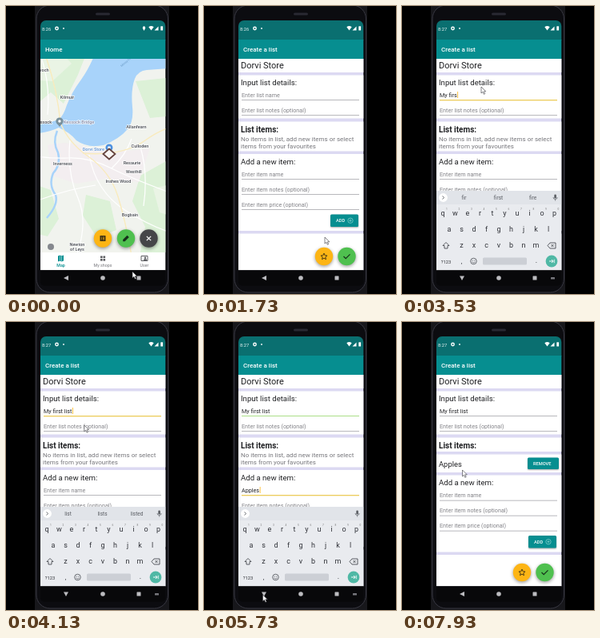
Write an HTML page with a canvas that moves like this. It is 240 by 360 pixels and loops after 8 s.

```html
<!DOCTYPE html>
<html lang="en">
<head>
<meta charset="utf-8">
<title>Shopping list demo</title>
<style>
html, body { margin: 0; width: 100%; height: 100%; overflow: hidden; background: #000; }
canvas { display: block; width: 100vw; height: 100vh; }
</style>
</head>
<body>
<canvas id="stage"></canvas>
<script>
const canvas = document.getElementById('stage');
const c = canvas.getContext('2d');
const LOOP = 8000, SHOP = 'Dorvi Store';
const TEAL = '#068e90', AMBER = '#fdb515', GREEN = '#4fc04f', INK = '#202124', GREY = '#77777c';
const FONT = 'Roboto, sans-serif';
const LEFT = 43, WIDTH = 156.3, BOTTOM = 330.3;

// Moments of the demo, in ms
const OPEN_LIST = 1600, KEYS_IN = 2800, FOCUS_ITEM = 4480, KEYS_OUT = 5850, ADD_ITEM = 7060;

// Pointer path: time, x, y
const POINTER = [
  [0, 158, 332], [600, 158, 331], [1000, 157, 298], [1250, 151, 289], [1750, 151, 289],
  [2500, 61, 111], [2850, 61, 111], [3450, 99, 101], [4000, 99, 101], [4400, 94, 212],
  [4900, 94, 212], [5650, 73.5, 341], [5950, 73.5, 341], [6650, 175, 267],
  [7150, 175, 267], [7850, 75.5, 185]
];

const clamp = x => Math.max(0, Math.min(1, x));
const ease = x => x * x * (3 - 2 * x);

function pointerAt(t) {
  const next = POINTER.findIndex(p => p[0] > t);
  if (next < 0) return POINTER[POINTER.length - 1].slice(1);
  const [t0, x0, y0] = POINTER[next - 1], [t1, x1, y1] = POINTER[next];
  const k = ease((t - t0) / (t1 - t0));
  return [x0 + (x1 - x0) * k, y0 + (y1 - y0) * k];
}

function rect(x, y, w, h, fill, r = 0) {
  c.fillStyle = fill;
  c.beginPath();
  c.roundRect(x, y, w, h, r);
  c.fill();
}

function band(y, h, fill, r = 0) {
  rect(LEFT, y, WIDTH, h, fill, r);
}

function clipBand(y, h) {
  c.beginPath();
  c.rect(LEFT, y, WIDTH, h);
  c.clip();
}

function disc(x, y, r, fill) {
  c.fillStyle = fill;
  c.beginPath();
  c.arc(x, y, r, 0, 7);
  c.fill();
}

function ring(x, y, r, color, width = 0.8) {
  c.strokeStyle = color;
  c.lineWidth = width;
  c.beginPath();
  c.arc(x, y, r, 0, 7);
  c.stroke();
}

function shape(d, fill, stroke, width = 1, x = 0, y = 0) {
  const path = new Path2D(d);
  c.save();
  c.translate(x, y);
  if (fill) { c.fillStyle = fill; c.fill(path); }
  if (stroke) { c.strokeStyle = stroke; c.lineWidth = width; c.stroke(path); }
  c.restore();
}

function text(s, x, y, size, color = INK, weight = 400, align = 'left') {
  c.font = `${weight} ${size}px ${FONT}`;
  c.fillStyle = color;
  c.textAlign = align;
  c.fillText(s, x, y + size * 0.355);
}

function fab(x, y, color) {
  c.save();
  c.shadowColor = '#0006';
  c.shadowBlur = 4;
  c.shadowOffsetY = 1.5;
  disc(x, y, 11.2, color);
  c.restore();
}

function phone() {
  rect(0, 0, 240, 360, '#000');
  rect(36, 0, 168, 360, '#17171b');
  rect(38, -1, 164.5, 359, '#0c0c10', 17);
  c.strokeStyle = '#383842';
  c.lineWidth = 1;
  c.stroke();
  rect(112, 8.5, 18, 3, '#292932', 1.5);
}

function bars(title, clock, onMap) {
  band(18, 25, '#0a6f70', [7, 7, 0, 0]);
  band(42, 24, TEAL);
  text(title, 49, 54.5, 8, '#fff', 500);
  text(clock, 45, 28.5, 5.8, '#e4f2f1');
  ring(63.5, 28, 1.7, '#fff', 1.4);
  disc(72, 28, 0.9, '#fff');
  if (onMap) shape('M0 3L-1.7-.3Q-1.7-2.7 0-2.7T1.7-.3Z', '#fff', null, 1, 172.5, 28);
  shape('M-3.2-1.8Q0-4 3.2-1.8L0 2.5Z', '#fff', null, 1, 181.5, 28);
  shape('M-2.5 2.5H2.5V-2.5Z', '#fff', null, 1, 188, 28);
  rect(193.3, 25.3, 2.8, 5.3, '#fff', 0.5);
}

function navBar(keyboard) {
  band(BOTTOM, 19.5, '#08080a', [0, 0, 5, 5]);
  shape(keyboard ? 'M-3-2.5H3L0 3Z' : 'M3-3V3L-3 0Z', '#bcbcc0', null, 1, 75, 340);
  disc(121, 340, 2.8, '#bcbcc0');
  rect(163.5, 337.5, 5, 5, '#bcbcc0', 0.5);
  if (keyboard) rect(186, 339, 5, 2.5, '#77777d', 0.5);
}

const PLACES = [
  ['Avoch', 38, 82], ['Kilmuir', 68.5, 116], ['North Kessock', 31, 147], ['Allanfearn', 155, 153],
  ['Balloch', 187, 167], ['Culloden', 159.5, 177.5], ['Resaurie', 149.5, 198],
  ['Westhill', 152, 209], ['Inshes Wood', 132.5, 221], ['Bogbain', 147, 263],
  ['Inverness', 63, 199.5], ['Newton', 81, 300], ['of Leys', 81, 306]
];

function label(s, x, y, color = '#484b52', align = 'center') {
  c.font = `500 5.5px ${FONT}`;
  c.strokeStyle = '#fffc';
  c.lineWidth = 1.5;
  c.textAlign = align;
  c.strokeText(s, x, y + 1.95);
  text(s, x, y, 5.5, color, 500, align);
}

function map(t) {
  const pan = Math.pow(1 - clamp(t / 450), 3);
  c.save();
  clipBand(66, 242);
  c.translate(8 * pan, -2 * pan);
  rect(20, 50, 200, 270, '#f1f3ee');

  // Woods and fields
  shape(`M20 50H97L82 88 64 124 48 110 34 122 20 118Z
    M154 96L210 90V138L172 142Z M160 214L210 186V320H158L166 278 150 246Z
    M20 222L48 232 58 268 44 290 20 284Z M92 238L122 246 130 282 106 292 88 264Z`, '#dcf1d7');
  shape('M20 70L60 58 74 74 50 96 20 94ZM176 230L210 222V268L184 260Z', '#eaf4e5');
  shape('M44 176Q72 168 104 183Q145 184 172 180L158 222 116 218 80 224 50 214Z', '#f3eef0');

  // Firth, narrows and river
  shape(`M104 60Q96 80 86 94Q74 110 68 126Q64 139 58 144Q42 150 20 151V162
    Q44 161 58 154Q72 160 80 170Q94 180 114 176Q134 168 144 156Q152 146 150 128
    Q148 106 153 93Q157 83 168 82L210 79V60Z`, '#a8d3fa');
  shape('M56 158Q50 173 57 185Q61 200 51 211Q45 226 54 238Q58 250 43 267', null, '#a8d3fa', 2.5);

  // Roads
  shape(`M20 188Q44 193 70 192T124 205T210 240 M72 170Q68 210 82 242T78 320
    M124 205Q142 188 149 168 M96 188Q104 234 142 258T210 288 M20 250Q62 232 104 226
    M34 60Q48 98 44 138 M160 178Q170 212 164 252`, null, '#fff', 1.2);
  shape('M40 60Q56 104 60 148Q70 172 92 188Q122 208 132 240T150 320M88 186Q138 190 166 170T214 152',
    null, '#f9ebbd', 1.4);

  // Labels that would not fit whole at the right edge wait for the pan to settle
  PLACES.filter(([, x]) => x + 8 * pan < 190).forEach(p => label(...p));
  label('Kessock Bridge', 64, 147.5, '#8a8ea8', 'left');
  label(SHOP, 115, 181, '#5a8fd0', 'right');
  c.save();
  c.translate(143, 71);
  c.rotate(-0.7);
  text('Moray Firth', 0, 0, 3.8, '#6c9cc8', 400, 'center');
  c.restore();
  shape('M-3 3L0 7 3 3Z', '#78909c', null, 1, 59, 146);
  disc(59, 146, 4.6, '#78909c');
  disc(59, 146, 1.7, '#fff');
  disc(121, 179, 4.5, '#4d91df');
  rect(119.3, 177.5, 3.4, 3, '#fff', 0.5);
  shape('M0-6.5L7.5 0 0 6.5-7.5 0Z', '#f8f5f3', '#65443e', 1.8, 121, 187);
  c.restore();
  disc(56, 301, 4, '#85888e');
}

function shopIcon(x, y, color) {
  for (const dx of [-3, 0.5]) for (const dy of [-3, 0.5]) rect(x + dx, y + dy, 2.6, 2.6, color);
}

function mapPage(t) {
  map(t);
  fab(121, 290.5, AMBER);
  rect(117.5, 287, 7, 7, '#3b3014', 0.6);
  shape('M-2-1.5H-1M0-1.5H2M-2 0H-1M0 0H2M-2 1.5H-1M0 1.5H2', null, AMBER, 0.7, 121, 290.5);
  fab(150, 290.5, GREEN);
  shape('M-3.8 3.8V1.4L1.4-3.8 3.8-1.4-1.4 3.8Z', '#16301a', null, 1, 150, 290.5);
  fab(178.5, 290.5, '#454548');
  shape('M-2.7-2.7L2.7 2.7M2.7-2.7L-2.7 2.7', null, '#fff', 1.2, 178.5, 290.5);

  band(308, BOTTOM - 308, '#fff');
  shape('M-3.5-3L-1-4 1-3 3.5-4V3L1 4-1 3-3.5 4Z', TEAL, null, 1, 68.5, 315.5);
  shape('M-1-3.3V2.7M1-2.6V3.4', null, '#fff', 0.5, 68.5, 315.5);
  shopIcon(121, 315.5, '#5c5d61');
  shape('M-4-3H4V3H-4Z', null, '#5c5d61', 1, 173, 315.5);
  disc(174, 314.7, 1.2, '#5c5d61');
  rect(172, 316.2, 4, 2, '#5c5d61', 1);
  text('Map', 68.5, 324.5, 5.3, TEAL, 500, 'center');
  text('My shops', 121, 324.5, 5.3, GREY, 400, 'center');
  text('User', 173, 324.5, 5.3, GREY, 400, 'center');
}

function field(y, hint, value = '', focused = false, line = '#a0a0a6') {
  text(value || hint, 47, y, 7.2, value ? INK : '#828287');
  if (focused) rect(47.7 + (value ? c.measureText(value).width : 0), y - 4, 0.8, 8, AMBER);
  rect(47, y + 6.2, 147, focused ? 1 : 0.7, focused ? '#e6bd28' : line);
}

function button(x, y, w, h, name) {
  c.save();
  c.shadowColor = '#0005';
  c.shadowBlur = 2;
  c.shadowOffsetY = 1;
  rect(x, y, w, h, TEAL, 1.5);
  c.restore();
  text(name, x + 7, y + h / 2, 5.7, '#fff', 500);
}

function card(y, h) {
  band(y, h, '#fff');
}

function listPage(t) {
  const added = t >= ADD_ITEM, onItem = t >= FOCUS_ITEM && t < KEYS_OUT;
  const listName = 'My first list'.slice(0, Math.max(0, Math.floor((t - 3000) / 75)));
  const itemName = added ? '' : 'Apples'.slice(0, Math.max(0, Math.floor((t - 4650) / 130)));
  const shift = added ? 6.5 : 0;

  band(66, BOTTOM - 66, '#dcd9f2');
  card(66, 17);
  text(SHOP, 46, 74.5, 11);
  card(86.5, 54);
  text('Input list details:', 46, 95.5, 9.6);
  field(111, 'Enter list name', listName, t >= KEYS_IN && t < FOCUS_ITEM, onItem ? '#8fd462' : undefined);
  field(130, 'Enter list notes (optional)');

  card(144.5, added ? 17.5 : 37);
  text('List items:', 46, 154, 10, INK, 700);
  if (added) {
    card(165.5, 22.5);
    text('Apples', 46, 177.5, 9.4);
    button(157, 169.5, 39, 14.5, 'REMOVE');
  } else {
    text('No items in list, add new items or select', 46, 166, 8, GREY);
    text('items from your favourites', 46, 175, 8, GREY);
  }

  c.save();
  c.translate(0, shift);
  card(185, 96);
  text('Add a new item:', 46, 194.5, 9.6);
  field(210, 'Enter item name', itemName, onItem);
  field(229, 'Enter item notes (optional)');
  field(248, 'Enter item price (optional)');
  button(158, 260.5, 35, 15.5, 'ADD');
  ring(183, 268.2, 3.2, '#8fd5d1', 0.7);
  shape('M-1.6 0H1.6M0-1.6V1.6', null, '#8fd5d1', 0.7, 183, 268.2);
  c.restore();
  card(284.5 + shift, BOTTOM - 284.5 - shift);

  fab(150, 313, AMBER);
  shape('M0-4L1.2-1.2 4-1 1.8.9 2.5 3.7 0 2.2-2.5 3.7-1.8.9-4-1-1.2-1.2Z', null, '#3b3014', 0.9, 150, 313);
  fab(178.5, 313, GREEN);
  shape('M-4 0L-1.3 2.7 4-2.7', null, '#16301a', 1.2, 178.5, 313);
  return { listName, itemName };
}

function suggestions(listName, itemName, onItem) {
  if (onItem) return itemName.length > 3 ? [] : ['A', 'And', 'Also'];
  if (listName.length > 8) return ['list', 'lists', 'listed'];
  return listName.length > 3 ? ['fir', 'first', 'fire'] : ['I', 'The', 'My'];
}

function keyboard(t, { listName, itemName }) {
  const shown = Math.min(clamp((t - KEYS_IN) / 180), clamp((KEYS_OUT + 180 - t) / 180));
  if (!shown) return;
  c.save();
  clipBand(66, BOTTOM - 66);
  c.translate(0, 100 * (1 - ease(shown)));
  band(231, 100, '#e9ebef');
  band(231, 17, '#e1e4e9');
  disc(51.5, 239.5, 5.4, '#fff');
  shape('M-1-2L1 0-1 2', null, '#5a5d63', 0.9, 51.5, 239.5);
  suggestions(listName, itemName, t >= FOCUS_ITEM).forEach((word, i) =>
    text(word, 77.5 + i * 43, 239.5, 6.5, '#5a5d63', 400, 'center'));
  rect(190.3, 235.5, 2.6, 5, '#5a5d63', 1.3);
  shape('M-2.6-.5Q-2.6 2 0 2T2.6-.5M0 2V4', null, '#5a5d63', 0.7, 191.6, 239.5);

  [['qwertyuiop', 51, 259], ['asdfghjkl', 59, 279], ['zxcvbnm', 74.5, 299]].forEach(([row, x, y]) =>
    [...row].forEach((key, i) => text(key, x + i * 15.5, y, 9, '#303238', 400, 'center')));
  for (let i = 0; i < 10; i++) text((i + 1) % 10, 56 + i * 15.5, 254, 3.2, '#777', 400, 'center');

  shape('M0-4L4 0H2V3.5H-2V0H-4Z', null, '#4a4d53', 0.9, 55, 299.5);
  shape('M-5 0L-2-3.5H5V3.5H-2ZM-.5-1.5L2.5 1.5M2.5-1.5L-.5 1.5', null, '#4a4d53', 0.9, 187, 299.5);
  text('?123', 55, 319.5, 5.8, '#303238', 400, 'center');
  text(',', 74.5, 319, 8, '#303238', 400, 'center');
  ring(89.5, 319, 3.8, '#4a4d53');
  disc(88.2, 318, 0.6, '#4a4d53');
  disc(90.8, 318, 0.6, '#4a4d53');
  shape('M-2 1Q0 3.3 2 1', null, '#4a4d53', 0.7, 89.5, 319);
  rect(101, 314.5, 55, 9, '#cccfd5', 1.5);
  text('.', 168, 318, 9, '#303238', 400, 'center');
  disc(187, 319, 7.4, '#4fb8a5');
  shape('M-3 0H2M0-2L2 0 0 2M3.2-2.2V2.2', null, '#fff', 0.9, 187, 319);
  c.restore();
}

function draw(t) {
  const onMap = t < OPEN_LIST;
  phone();
  bars(onMap ? 'Home' : 'Create a list', t < 3200 ? '8:26' : '8:27', onMap);
  if (onMap) mapPage(t);
  else keyboard(t, listPage(t));
  navBar(t >= KEYS_IN && t < KEYS_OUT);
  shape('M0 0V8L1.9 6.3 3.3 9.3 4.7 8.7 3.3 5.8H5.8Z', '#fff', '#34343a', 0.6, ...pointerAt(t));
}

function resize() {
  canvas.width = innerWidth * devicePixelRatio;
  canvas.height = innerHeight * devicePixelRatio;
}
addEventListener('resize', resize);
resize();

const start = performance.now();
function tick() {
  c.setTransform(canvas.width / 240, 0, 0, canvas.height / 360, 0, 0);
  draw((performance.now() - start) % LOOP);
  requestAnimationFrame(tick);
}
tick();
</script>
</body>
</html>
```
